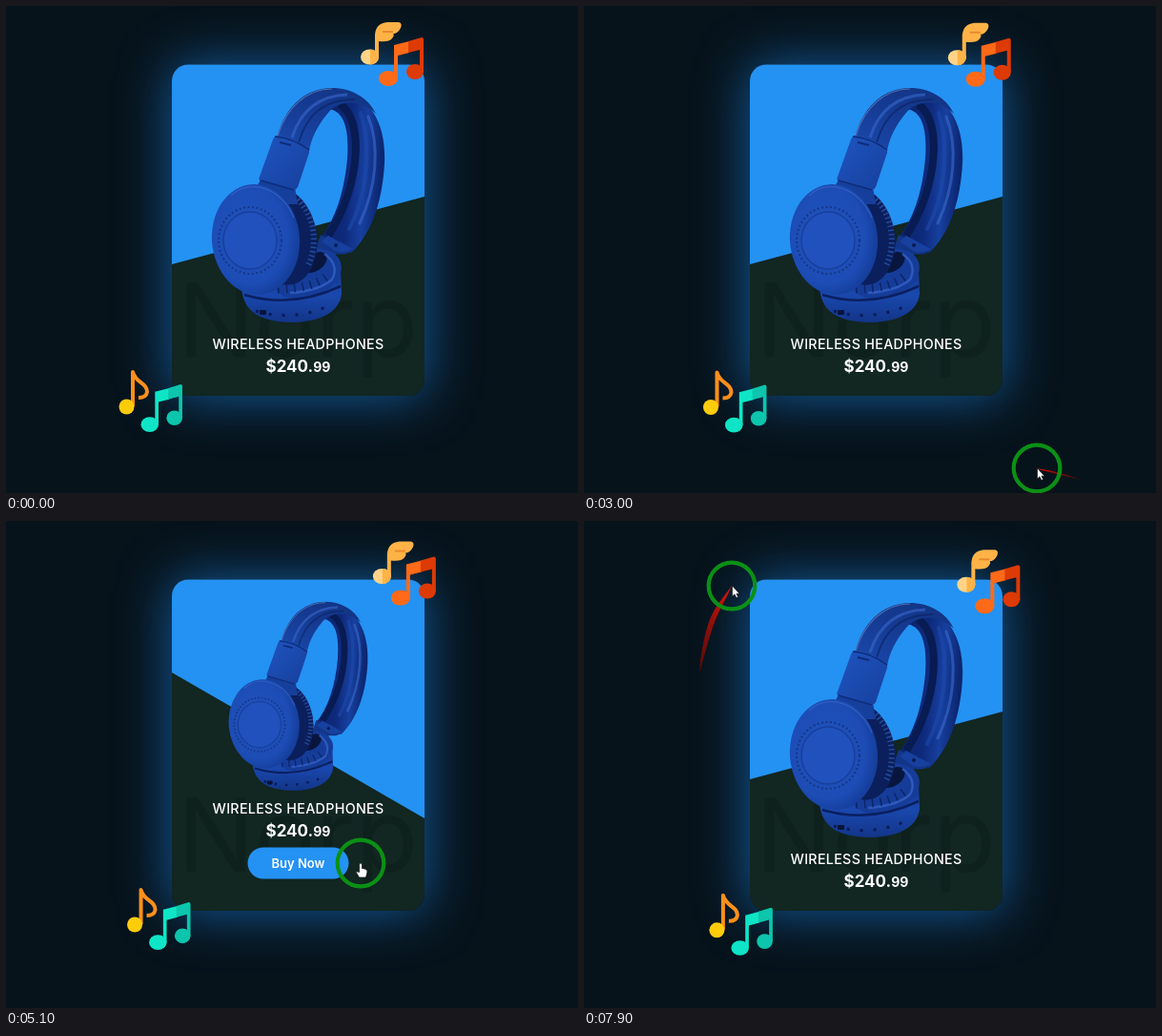
These frames come from a looping animation (600 by 511 pixels, 8000 ms). An HTML page:

```html
<!DOCTYPE html>
<html lang="en">
<head>
<meta charset="utf-8">
<title>Product card</title>
<style>
  html, body { margin: 0; width: 100%; height: 100%; overflow: hidden; background: #07131b; }
  .glow {
    position: absolute; left: 174px; top: 61.5px; width: 265px; height: 347.5px;
    border-radius: 17px; box-shadow: 0 0 54px rgba(25, 125, 220, .7);
  }
  svg { position: absolute; left: 0; top: 0; display: block; }
  text { font-family: Inter, "Open Sans", sans-serif; text-anchor: middle; fill: #fff; }
  .brand { font-size: 107px; fill: #000; opacity: .12; }
  .title { font-size: 14.3px; font-weight: 500; letter-spacing: .3px; }
  .price { font-size: 17px; font-weight: 700; }
  .cents { font-size: 14px; }
  .buy { font-size: 13px; font-weight: 600; }
  .warm { --a: #ff6a18; --b: #dd3a05; }
  .cool { --a: #0fe5c6; --b: #0cc5ac; }
</style>
</head>
<body>
<div class="glow"></div>
<svg width="600" height="511" viewBox="0 0 600 511">
  <defs>
    <clipPath id="card"><rect x="174" y="61.5" width="265" height="347.5" rx="17"/></clipPath>
    <linearGradient id="limb" x1="0" x2="1" y1="0" y2=".15">
      <stop offset="0" stop-color="#0b2264"/>
      <stop offset=".5" stop-color="#0e2a7c"/>
      <stop offset=".75" stop-color="#17409f"/>
      <stop offset="1" stop-color="#0c2670"/>
    </linearGradient>
    <linearGradient id="band" x1="0" x2="1" y1="1" y2="0">
      <stop offset="0" stop-color="#1b4aae"/>
      <stop offset=".5" stop-color="#153a92"/>
      <stop offset="1" stop-color="#12337f"/>
    </linearGradient>
    <linearGradient id="slide" x1="0" x2="1" y1="0" y2="1">
      <stop offset="0" stop-color="#1f55c0"/>
      <stop offset="1" stop-color="#163f9c"/>
    </linearGradient>
    <radialGradient id="cup" cx=".42" cy=".45" r=".62">
      <stop offset="0" stop-color="#2153bf"/>
      <stop offset=".72" stop-color="#1c4cb4"/>
      <stop offset="1" stop-color="#133a94"/>
    </radialGradient>
    <linearGradient id="base" x1="0" x2="0" y1="0" y2="1">
      <stop offset="0" stop-color="#0e2b7c"/>
      <stop offset=".6" stop-color="#1a48ae"/>
      <stop offset="1" stop-color="#123588"/>
    </linearGradient>
    <g id="pair">
      <path fill="var(--a)" d="M16 8L32 4V16L20 19V43H16Z"/>
      <path fill="var(--b)" d="M31 4L45 0Q47 0 47 2V36H43V13L31 16Z"/>
      <ellipse cx="10" cy="43" rx="10" ry="8" fill="var(--a)"/>
      <ellipse cx="38" cy="36" rx="9" ry="8" fill="var(--b)"/>
    </g>
  </defs>

  <g clip-path="url(#card)">
    <rect x="174" y="61" width="265" height="348" fill="#122622"/>
    <text class="brand" x="306" y="368">Norp</text>
    <rect id="slope" x="-133" y="-400" width="266" height="400" fill="#2492f3"/>

    <g id="phones">
      <path fill="url(#limb)" d="M346 88C383 92 399 125 397 165C395 205 383 240 362 259L330 243C345 225 355 195 358 160C360 132 356 110 338 108Z"/>
      <path fill="none" stroke="#081b52" stroke-width="8" d="M350 103C376 118 372 190 338 241"/>
      <path fill="none" stroke="#3563c4" stroke-width="3" stroke-linecap="round" opacity=".7" d="M380 116C392 146 389 190 371 228"/>
      <path fill="none" stroke="#1d4aae" stroke-width="4" stroke-linecap="round" opacity=".6" d="M372 112C384 150 378 200 360 234"/>
      <path fill="url(#band)" d="M284 138C292 108 312 86 342 86C362 86 380 96 388 113C372 98 350 98 338 112C326 126 320 140 318 152Z"/>
      <path fill="none" stroke="#3461c4" stroke-width="3" opacity=".7" d="M300 138C310 107 330 94 358 93"/>
      <path fill="none" stroke="#0c2668" stroke-width="2" opacity=".7" d="M307 143C316 113 334 98 366 98"/>
      <path fill="none" stroke="#5a7cb4" stroke-width="1.2" opacity=".8" d="M285 136C294 107 315 87 342 87"/>

      <path fill="url(#base)" d="M247 294C248 319 264 332 302 332C333 331 351 319 352 301L351 276C347 261 334 256 320 259Z"/>
      <path fill="#123588" d="M330 240L362 257Q357 262 346 260L351 280L318 276Z"/>
      <ellipse cx="316" cy="281" rx="37" ry="25" transform="rotate(-20 316 281)" fill="#153c98"/>
      <ellipse cx="324" cy="269" rx="14" ry="9" transform="rotate(-35 324 269)" fill="#08163e"/>
      <path fill="none" stroke="#3a66cc" stroke-width="2.500" opacity=".7" d="M334 260Q350 272 342 287Q328 299 298 301"/>
      <path fill="none" stroke="#0c2568" stroke-width="9" stroke-dasharray="1.500 7" d="M285 297Q322 297 338 282"/>
      <path fill="none" stroke="#0a2060" stroke-width="2.500" d="M250 303Q300 318 351 294"/>
      <path fill="none" stroke="#0a1b58" stroke-width="3" stroke-dasharray="3 11" d="M262 320Q302 332 342 313"/>
      <rect x="266" y="319" width="7" height="5" rx="1" fill="#08143c"/>
      <path fill="#17409f" d="M338 241L364 255Q353 261 344 256L331 247Z"/>
      <circle cx="346" cy="251" r="2" fill="#091c50"/>

      <ellipse cx="291" cy="242" rx="35" ry="51" transform="rotate(-9 291 242)" fill="#0b1f5c"/>
      <path fill="none" stroke="#264b9c" stroke-width="6" stroke-dasharray="1.500 3" d="M306 203C324 220 328 252 316 274"/>
      <path fill="#163f9c" d="M268 180L303 190L306 208H254Z"/>
      <ellipse cx="262" cy="245" rx="46" ry="58" transform="rotate(-5 262 245)" fill="url(#cup)"/>
      <path fill="none" stroke="#3a68cc" stroke-width="1.500" opacity=".6" d="M236 199C256 179 290 192 302 222"/>
      <ellipse cx="256" cy="246" rx="28" ry="30" fill="#2051bc" stroke="#173f9c" stroke-width="1.500"/>
      <ellipse cx="256" cy="246" rx="33" ry="35" fill="none" stroke="#143888" stroke-width="2.200" stroke-dasharray="2 2.500"/>
      <path fill="url(#slide)" d="M284 136Q298 136 317 149Q319 151 318 154L306 190Q304 194 300 192L268 184Q264 183 266 179L280 140Q281 137 284 136Z"/>
      <path fill="none" stroke="#0e2c78" stroke-width="1.500" d="M282 137Q300 138 318 151M267 183L302 193"/>
      <path fill="none" stroke="#0e2c78" stroke-width="2" d="M287 143L299 146"/>
    </g>

    <g id="info">
      <text class="title" x="306.5" y="360">WIRELESS HEADPHONES</text>
      <text class="price" x="306.5" y="384">$240.<tspan class="cents">99</tspan></text>
    </g>
    <g id="button">
      <rect x="253.5" y="342.5" width="106" height="33" rx="16.5" fill="#2492f3"/>
      <text class="buy" x="306.5" y="364">Buy Now</text>
    </g>
  </g>

  <g id="warm" class="warm">
    <path fill="#ffb347" d="M387 54V30Q388 18 400 17H412Q416 18 414 23Q411 29 406 29Q408 30 405 34Q402 38 391 37V54Z"/>
    <path stroke="#e98a2a" stroke-width="2" d="M395 27H406"/>
    <ellipse cx="381.500" cy="53.500" rx="9.500" ry="8" fill="#ffd488"/>
    <path fill="#ffb347" d="M382 45.500A9 8 0 0 1 382 61.500Z"/>
    <use href="#pair" x="391" y="33"/>
  </g>
  <g id="cool" class="cool">
    <path fill="none" stroke="#ff8f1c" stroke-width="4" stroke-linejoin="round" d="M133 420V384C136 396 148 395 148 405Q147 411 139 411"/>
    <circle cx="126.500" cy="420.500" r="8" fill="#ffcc0c"/>
    <use href="#pair" transform="translate(141.500 397) scale(.925 .98)"/>
  </g>

  <g id="trail" stroke-linecap="round"></g>
  <g id="pointer">
    <circle r="24.300" fill="none" stroke="#0b9015" stroke-width="4.200"/>
    <path id="arrow" fill="#fff" stroke="#111" stroke-width=".6" d="M.5 0V11L3 8.800L4.800 12.600L6.600 11.800L4.900 8.200H8Z"/>
    <path id="hand" fill="#fff" stroke="#111" stroke-width=".7" d="M-1.500 1Q0-1 1.500 1V5.500L5 6.200Q7 6.800 7 9L5.500 15H-1.500L-4.500 10Q-4.500 8-1.500 9.500Z"/>
  </g>
</svg>
<script>
  const LOOP = 8000, STEP = 100, FADE = 500, ENTER = 3850, LEAVE = 6600;
  // Pointer path: time, x, y
  const path = [
    [0, 800, 510], [500, 735, 500], [1000, 770, 505], [1400, 800, 510],
    [1800, 725, 515], [2500, 640, 520], [2600, 586, 509], [2700, 534, 500],
    [2800, 522, 497], [2900, 492, 489], [3000, 475, 485], [3400, 448, 462],
    [3600, 425, 437], [3800, 408, 411], [4000, 396, 392], [4500, 377, 364],
    [5100, 372, 359], [5900, 368, 362], [6000, 362, 370], [6100, 338, 384],
    [6200, 302, 388], [6400, 240, 380], [6600, 175, 350], [6800, 135, 308],
    [7200, 124, 260], [7500, 119, 210], [7700, 121, 160], [7800, 134, 106],
    [7900, 155, 68]
  ];
  const el = id => document.getElementById(id);
  const move = (id, value) => el(id).setAttribute('transform', value);
  const clamp = v => Math.min(1, Math.max(0, v));
  const ease = v => { v = clamp(v); return v * v * (3 - 2 * v); };

  const PIECES = 20;
  const trail = Array.from({ length: PIECES }, () =>
    el('trail').appendChild(document.createElementNS('http://www.w3.org/2000/svg', 'line')));

  // Speed along one axis at a path point, from its neighbours
  function speed(i, axis) {
    const a = path[Math.max(0, i - 1)], b = path[Math.min(path.length - 1, i + 1)];
    return (b[axis] - a[axis]) / (b[0] - a[0]);
  }

  // Smooth cubic curve through the path points
  function pointerAt(t) {
    if (t <= 0) return path[0].slice(1);
    const i = path.findIndex(p => p[0] >= t);
    if (i < 0) return path[path.length - 1].slice(1);
    const from = path[i - 1], to = path[i], span = to[0] - from[0];
    const k = (t - from[0]) / span;
    return [1, 2].map(axis =>
      from[axis] + (to[axis] - from[axis]) * ease(k) +
      span * k * (1 - k) * (speed(i - 1, axis) * (1 - k) - speed(i, axis) * k));
  }

  function drawTrail(t) {
    const points = Array.from({ length: PIECES + 1 }, (_, i) => pointerAt(t - 200 * i / PIECES));
    const [head, tail] = [points[0], points[PIECES]];
    const reach = Math.hypot(tail[0] - head[0], tail[1] - head[1]);
    const thick = reach < 40 ? 0 : 5.5 * Math.min(1, (reach / 90) ** 2);
    trail.forEach((line, i) => {
      const k = (i + .5) / PIECES;
      const [[x1, y1], [x2, y2]] = [points[i], points[i + 1]];
      const look = {
        x1, y1, x2, y2,
        'stroke-width': thick * Math.sin(Math.PI * k),
        stroke: `rgb(${Math.round(225 - 150 * k)},${Math.round(22 - 12 * k)},10)`
      };
      for (const key in look) line.setAttribute(key, look[key]);
    });
  }

  function draw(t) {
    const [x, y] = pointerAt(t);
    const hover = ease((t - ENTER) / FADE) - ease((t - LEAVE) / FADE);
    const inside = x > 174 && x < 439 && y > 62 && y < 409;
    const drift = rate => `translate(${(800 - x) * rate} ${(510 - y) * rate})`;

    move('slope', `translate(306.5 235.5) skewY(${-15 + 45 * hover})`);
    move('phones', `translate(306.5 80) scale(${1 - .195 * hover}) translate(-306.5 -80)`);
    move('info', `translate(0 ${-53 * hover})`);
    move('button', `translate(0 ${50 * (1 - hover)})`);
    el('button').setAttribute('opacity', hover);
    move('warm', drift(.03));
    move('cool', drift(.02));
    move('pointer', `translate(${x} ${y})`);
    el('arrow').setAttribute('visibility', inside ? 'hidden' : 'visible');
    el('hand').setAttribute('visibility', inside ? 'visible' : 'hidden');
    drawTrail(t);
  }

  function tick() {
    draw(Math.floor(performance.now() % LOOP / STEP) * STEP);
    requestAnimationFrame(tick);
  }
  tick();
</script>
</body>
</html>
```
